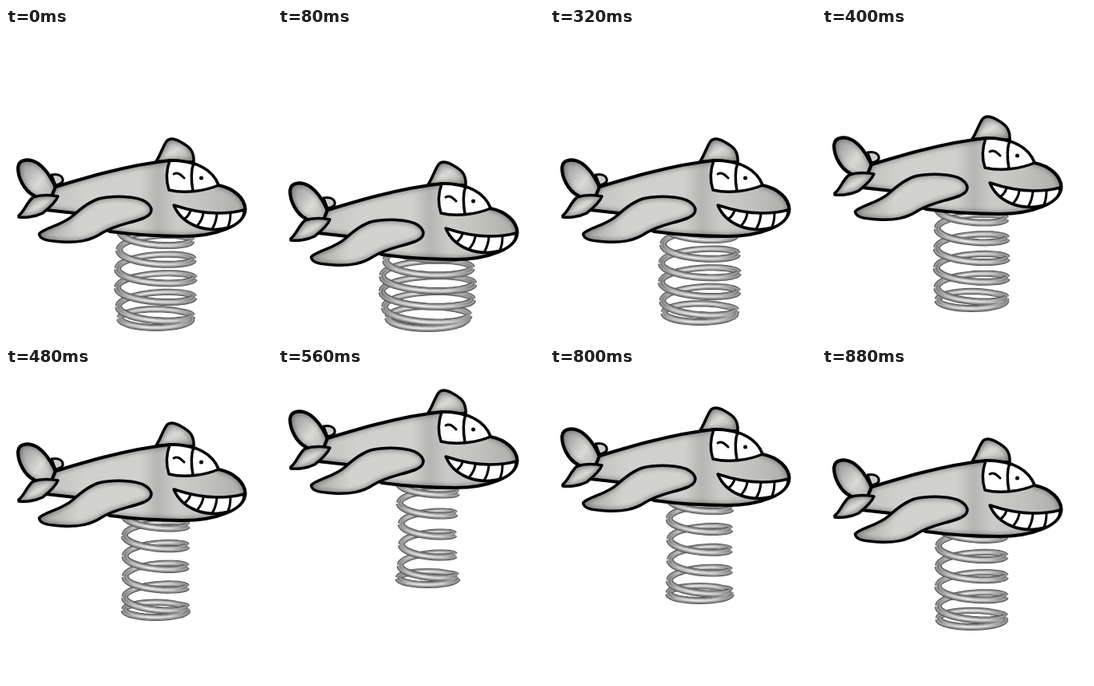
Animation, 333 px wide and 391 px high, one loop 0.96 s. Source, as an HTML page:

```html
<!DOCTYPE html>
<html lang="en">
<head>
<meta charset="utf-8">
<title>Spring plane</title>
<style>
html, body { margin: 0; width: 100%; height: 100%; overflow: hidden; background: #fff; }
svg { display: block; width: 333px; height: 391px; }
.ink { fill: none; stroke: #000; stroke-width: 4.2; stroke-linecap: round; stroke-linejoin: round; }
.mid { stroke-width: 3.5; }
.thin { stroke-width: 3; }
.tube path { fill: none; stroke-linejoin: round; }
.shade { fill: none; stroke: #444; stroke-width: 8; filter: url(#soft); opacity: .4; }
</style>
</head>
<body>
<svg viewBox="0 0 333 391">
  <defs>
    <filter id="soft" x="-20%" y="-20%" width="140%" height="140%" color-interpolation-filters="sRGB"><feGaussianBlur stdDeviation="2.6"/></filter>
    <linearGradient id="steel">
      <stop offset="0" stop-color="#777"/><stop offset=".15" stop-color="#c4c4c4"/>
      <stop offset=".4" stop-color="#e6e6e6"/><stop offset=".75" stop-color="#cfcfcf"/>
      <stop offset="1" stop-color="#777"/>
    </linearGradient>
    <linearGradient id="skin">
      <stop offset="0" stop-color="#c2c3c0"/><stop offset=".2" stop-color="#d0d1ce"/>
      <stop offset=".47" stop-color="#d0d1ce"/><stop offset=".56" stop-color="#b5b6b3"/>
      <stop offset=".66" stop-color="#cbccc9"/><stop offset=".8" stop-color="#c2c3c0"/>
      <stop offset="1" stop-color="#adaeab"/>
    </linearGradient>
    <linearGradient id="sheen" x2="1" y2="1">
      <stop offset="0" stop-color="#8c8d8a"/><stop offset=".5" stop-color="#d9dad7"/>
      <stop offset="1" stop-color="#a2a39f"/>
    </linearGradient>
    <linearGradient id="wingFill">
      <stop offset="0" stop-color="#a8a9a5"/><stop offset=".35" stop-color="#d2d3d0"/>
      <stop offset="1" stop-color="#d2d3d0"/>
    </linearGradient>
    <path id="rear" d="M57 184C66 182 72 186 71 192C69 196 66 196 62 197Z"/>
    <path id="tail" d="M35 210C23 204 15 188 15 175C16 163 30 164 39 169C51 177 58 190 63 202L62 227Z"/>
    <path id="body" d="M62 199C95 189 150 172 205 166C240 166 258 179 266 197C286 201 299 214 299.5 227C299 248 262 261 222 261C190 261 160 259 130 255L86 232L50 228Z"/>
    <path id="wing" d="M41.500 258C47 251 71 247 84 235C95 225 106 217 116 214C133 210 164 210 175 218C185 225 184 233 173 238C155 245 136 247 120 257C105 267 90 269 70 268C55 267 42 266 41.500 258Z"/>
    <path id="fin" d="M16 235C23 230 26 218 34 212C43 209 55 209 65 211C62 219 52 227 46 232C36 237 23 238 16 237Z"/>
    <path id="crest" d="M188 167C193 160 196 149 201 142C205 137 212 139 219 143C228 148 236 153 235 168Z"/>
    <path id="mouth" d="M210 222C225 227 242 232 265 232C281 232 291 230 298 228C299 238 292 244 282 249C250 259 220 246 210 222Z"/>
  </defs>

  <g class="tube" id="back"></g>
  <g class="tube" id="front"></g>
  <g id="plane"></g>
</svg>
<script>
const $ = id => document.getElementById(id);
const STEP = 80, CX = 187.5;

// plane offset, half width at mid spring, lowest point of the spring
const poses = [
  [0, 53, 380], [29, 62.5, 381], [33, 64, 386], [26, 61, 384],
  [0, 53, 373], [-28, 49, 356], [-70, 43, 317], [-111, 37.5, 276],
  [-130, 37, 257], [-120.5, 38, 266], [-89, 42, 296], [-50, 47, 329]
];

const part = (id, fill, weight = '', shade = true) => `
  <clipPath id="${id}Clip"><use href="#${id}"/></clipPath>
  <use href="#${id}" fill="${fill}"/>
  ${shade ? `<g clip-path="url(#${id}Clip)"><use href="#${id}" class="shade"/></g>` : ''}
  <use href="#${id}" class="ink ${weight}"/>`;
const line = (d, weight = 'thin') => `<path class="ink ${weight}" d="${d}"/>`;

$('plane').innerHTML =
  part('rear', '#cfcccb', 'thin', false) +
  part('tail', 'url(#sheen)') +
  part('crest', 'url(#sheen)', 'mid') +
  part('body', 'url(#skin)') +
  '<path class="ink mid" style="fill:#fff" d="M205 166C200 180 201 194 204 203C224 208 250 204 266 197C260 179 240 166 205 166Z"/>' +
  line('M235 169C231 180 232 193 234 204', 'mid') +
  line('M210 183C215 180 219 184 223 188') +
  '<circle cx="244.500" cy="188" r="2.500"/>' +
  part('mouth', '#fff', 'mid', false) +
  line('M231 229Q229 235 224 239M247 232Q246 240 240 247M264 233Q263 244 258 252M281 232Q281 242 278 249') +
  part('wing', 'url(#wingFill)', 'mid') +
  part('fin', 'url(#sheen)', 'mid');

const layers = [[9, '#4c4c4c'], [7.6, '#7c7c7c'], [5.2, '#a6a6a6'], [2.6, 'url(#steel)']];
for (const id of ['back', 'front']) {
  const scale = id === 'back' ? .9 : 1;
  $(id).innerHTML = layers.map(([w, c]) => `<path stroke="${c}" stroke-width="${w * scale}"/>`).join('');
}

// front halves run left to right, back halves return behind them;
// a squeezed spring bulges in the middle, a stretched one narrows
function coil(half, bottom) {
  const end = 41 + .53 * (half - 37);
  const ry = half * .22, base = bottom - ry - 4.5;
  const pitch = 26 - .0105 * (half - 38) ** 2;
  const top = base - 3 - 4 * pitch;
  const paths = { back: '', front: '' };
  for (let h = -2; h < 10; h++) {
    const side = h % 2 ? 'front' : 'back';
    for (let i = 0; i <= 16; i++) {
      const turn = (h + i / 16) / 2;
      const a = (turn + .5) * 2 * Math.PI;
      const u = Math.max(0, Math.min(1, turn / 4.3));
      const rx = end + (half - end) * Math.sin(Math.PI * u) - 4.5;
      const x = CX - rx * Math.cos(a);
      const y = Math.min(base, top + pitch * turn) + ry * Math.sin(a);
      paths[side] += (i ? 'L' : 'M') + x.toFixed(1) + ' ' + y.toFixed(1);
    }
  }
  return paths;
}

let shown = -1;
function draw(now) {
  const n = Math.floor(now / STEP) % poses.length;
  if (n === shown) return;
  shown = n;
  const [dy, half, bottom] = poses[n];
  $('plane').setAttribute('transform', `translate(0 ${dy})`);
  const paths = coil(half, bottom);
  for (const id in paths)
    for (const p of $(id).children) p.setAttribute('d', paths[id]);
}

const start = performance.now();
function tick() {
  draw(performance.now() - start);
  requestAnimationFrame(tick);
}
tick();
</script>
</body>
</html>
```
